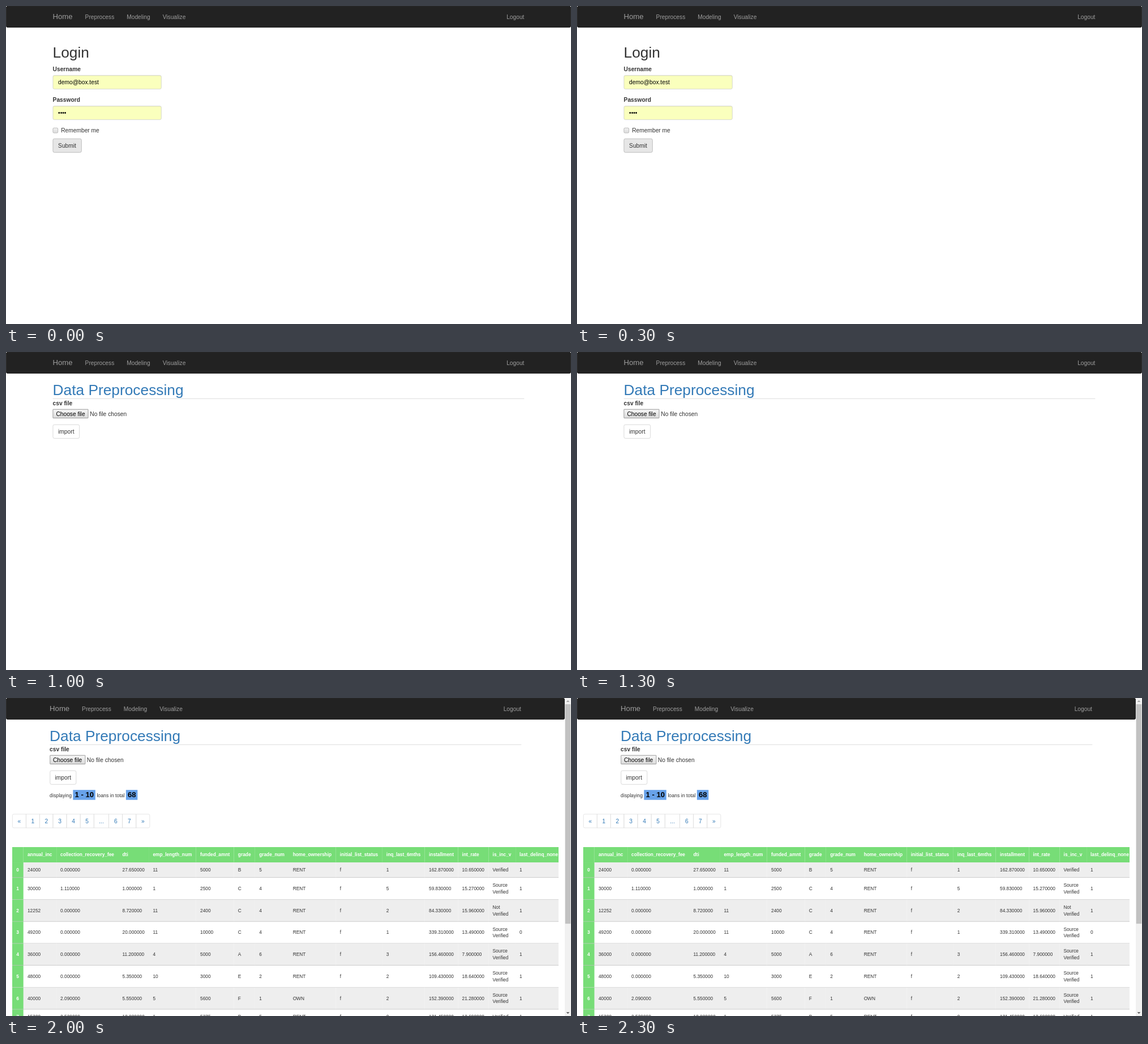
An HTML page for the animation above (2500 ms loop, 998 by 561 pixels).

```html
<!DOCTYPE html>
<html lang="en">
<head>
<meta charset="utf-8">
<title>Data Analytics</title>
<style>
* { box-sizing: border-box; }
html, body { margin: 0; width: 100%; height: 100%; overflow: hidden; background: #fff; }

/* The screen is laid out at 1366 x 768 and scaled to the stage. */
.screen {
  position: absolute; left: 0; top: 0; width: 1366px; height: 768px; overflow: hidden;
  transform: scale(calc(998 / 1366)); transform-origin: 0 0;
  font: 14px/20px "Liberation Sans", Arial, sans-serif; color: #333;
}
.page { position: absolute; left: 0; top: 0; width: 1366px; height: 768px; }
.wrap { width: 1140px; margin: 0 auto; }
.view { position: absolute; left: 0; right: 0; top: 72px; }

nav { height: 52px; background: #222; border: 1px solid #080808; border-radius: 4px; color: #9d9d9d; }
nav .wrap { display: flex; gap: 30px; padding-top: 15px; }
nav b { font-size: 18px; font-weight: normal; }
nav span:last-child { margin-left: auto; }

h1 { margin: 20px 0 10px; font-size: 36px; font-weight: normal; line-height: 39.6px; }
.title { margin: 0; color: #337ab7; border-bottom: 1px solid #d0d0d0; height: 40.6px; }
p { margin: 0; }
label { display: block; height: 25px; font-weight: bold; }
.title + label { position: relative; }

.field {
  width: 262.5px; height: 34px; margin-bottom: 15px; padding: 6px 12px;
  background: #faffbd; border: 1px solid #ccc; border-radius: 4px; color: #000;
  box-shadow: inset 0 1px 1px rgba(0, 0, 0, .075);
}
.check { position: relative; padding-left: 20px; margin-bottom: 10px; }
.check i {
  position: absolute; left: 0; top: 4px; width: 13px; height: 13px;
  border: 1px solid #a0a0a0; border-radius: 3px; background: linear-gradient(#f0f0f0, #dcdcdc);
}
.btn {
  display: inline-block; height: 34px; padding: 6px 12px;
  background: #fff; border: 1px solid #ccc; border-radius: 4px;
}
.hover { background: #e6e6e6; border-color: #adadad; }

.file { position: relative; height: 22px; margin-bottom: 15px; line-height: 22px; }
.file b {
  display: inline-block; height: 22px; padding: 0 7px; line-height: 20px; font-weight: normal; color: #000;
  border: 1px solid #777; border-radius: 1px; background: linear-gradient(#f6f6f6, #dcdcdc);
}
.file span { position: absolute; left: 90px; top: 0; }

.stats { position: absolute; top: 152px; font-size: 12px; white-space: nowrap; }
.stats b { padding: 2px 4px; font-size: 18px; color: #000; background: #68a2ea; }

.pager { position: absolute; left: 15px; top: 208px; display: flex; color: #337ab7; }
.pager span { height: 34px; padding: 6px 12px; border: 1px solid #ddd; margin-left: -1px; }
.pager span:first-child { margin-left: 0; border-radius: 4px 0 0 4px; }
.pager span:last-child { border-radius: 0 4px 4px 0; }

.grid { position: absolute; left: 15px; top: 288px; width: 1321px; height: 408px; overflow: hidden; }
table { width: min-content; border-spacing: 0; font-size: 11.4px; line-height: 16px; }
th, td { padding: 10px; text-align: left; vertical-align: middle; border-bottom: 1px solid #c0c0c0; }
th { color: #fff; background: #77dd77; }
th:first-child { min-width: 27px; }
thead th { border-color: #77dd77; }
tbody tr:nth-child(odd) { background: #eee; }

.bar { position: absolute; right: 0; top: 0; width: 15px; height: 768px; background: #f1f1f1; }
.bar i { position: absolute; left: 1px; top: 15px; width: 13px; height: 530px; background: #c1c1c1; }
.bar svg { position: absolute; left: 0; top: 0; }

/* Every part runs on the same 2.5 s clock with hard cuts. */
.page, .login, .home, .prep, .none, .name, .import, .result {
  animation: 2.5s step-end infinite;
}
.page { animation-name: page; }
.login { animation-name: login; }
.home { animation-name: home; }
.prep { animation-name: prep; }
.none { animation-name: none-chosen; }
.name { animation-name: name; }
.import { animation-name: press; }
.result { animation-name: result; }
@keyframes page { 0% { width: 1366px; } 80%, 100% { width: 1351px; } }
@keyframes login { 0% { visibility: visible; } 20%, 100% { visibility: hidden; } }
@keyframes home { 0%, 40%, 100% { visibility: hidden; } 20% { visibility: visible; } }
@keyframes prep { 0% { visibility: hidden; } 40%, 100% { visibility: visible; } }
@keyframes none-chosen { 0%, 60% { visibility: hidden; } 40%, 80%, 100% { visibility: visible; } }
@keyframes name { 0%, 80%, 100% { visibility: hidden; } 60% { visibility: visible; } }
@keyframes press {
  0%, 80%, 100% { background: #fff; border-color: #ccc; }
  60% { background: #e6e6e6; border-color: #adadad; }
}
@keyframes result { 0% { visibility: hidden; } 80%, 100% { visibility: visible; } }
</style>
</head>
<body>
<div class="screen">
  <div class="page">
    <nav><div class="wrap">
      <b>Home</b><span>Preprocess</span><span>Modeling</span><span>Visualize</span><span>Logout</span>
    </div></nav>

    <div class="view login"><div class="wrap" style="padding-top:.1px">
      <h1>Login</h1>
      <label>Username</label>
      <div class="field">demo@box.test</div>
      <label>Password</label>
      <div class="field">••••</div>
      <div class="check"><i></i>Remember me</div>
      <div class="btn hover">Submit</div>
    </div></div>

    <div class="view home"><div class="wrap" style="padding-top:.1px">
      <h1>Data Analytics</h1>
      <p>You are logged in.</p>
    </div></div>

    <div class="view prep">
      <div class="wrap">
        <h1 class="title">Data Preprocessing</h1>
        <label>csv file</label>
        <div class="file"><b>Choose file</b><span class="none">No file chosen</span><span class="name">lcdata_train.csv</span></div>
        <div class="btn import">import</div>
        <div class="stats result">displaying <b>1 - 10</b> loans in total <b>68</b></div>
      </div>
      <div class="result">
        <div class="pager"></div>
        <div class="grid"><table><thead></thead><tbody></tbody></table></div>
      </div>
    </div>
  </div>

  <div class="bar result">
    <i></i>
    <svg width="15" height="768">
      <path d="M3.5 9.5h8l-4-4z" fill="#a3a3a3"/>
      <path d="M3.5 758.5h8l-4 4z" fill="#505050"/>
    </svg>
  </div>
</div>
<script>
const heads = "annual_inc collection_recovery_fee dti emp_length_num funded_amnt grade grade_num " +
  "home_ownership initial_list_status inq_last_6mths installment int_rate is_inc_v last_delinq_none";
const loans = `
24000 0.000000 27.650000 11 5000 B 5 RENT f 1 162.870000 10.650000 Verified 1
30000 1.110000 1.000000 1 2500 C 4 RENT f 5 59.830000 15.270000 Source~Verified 1
12252 0.000000 8.720000 11 2400 C 4 RENT f 2 84.330000 15.960000 Not~Verified 1
49200 0.000000 20.000000 11 10000 C 4 RENT f 1 339.310000 13.490000 Source~Verified 0
36000 0.000000 11.200000 4 5000 A 6 RENT f 3 156.460000 7.900000 Source~Verified 1
48000 0.000000 5.350000 10 3000 E 2 RENT f 2 109.430000 18.640000 Source~Verified 1
40000 2.090000 5.550000 5 5600 F 1 OWN f 2 152.390000 21.280000 Source~Verified 1
15300 2.520000 18.080000 1 5375 B 5 RENT f 0 121.450000 12.690000 Verified 1`;

const cells = (tag, line) =>
  line.split(" ").map(v => `<${tag}>${v.replace("~", " ")}</${tag}>`).join("");
const $ = s => document.querySelector(s);

$("thead").innerHTML = `<tr><th></th>${cells("th", heads)}</tr>`;
$("tbody").innerHTML = loans.trim().split("\n")
  .map((line, i) => `<tr><th>${i}</th>${cells("td", line)}</tr>`).join("");
$(".pager").innerHTML = cells("span", "« 1 2 3 4 5 ... 6 7 »");
</script>
</body>
</html>
```
